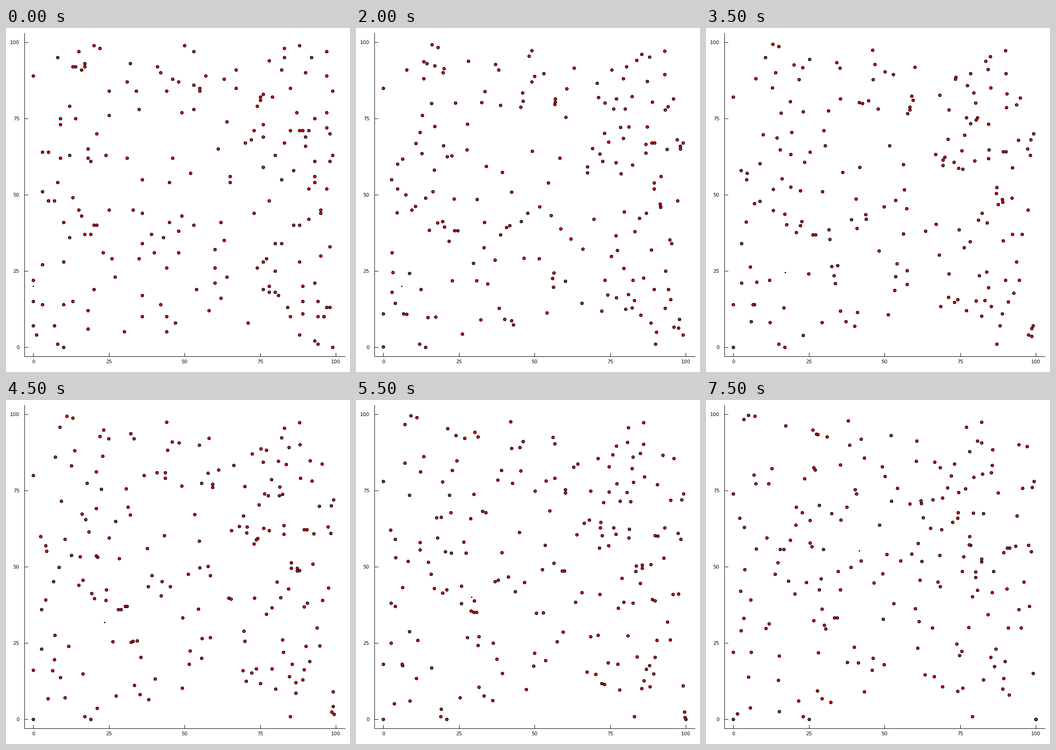
Write a matplotlib script that moves like this. It is 748 by 749 pixels and loops after 8000 ms.

```python
import numpy as np
import matplotlib.pyplot as plt
from matplotlib.animation import FuncAnimation

W, H, DPI = 748, 749, 100
FRAMES, INTERVAL = 16, 500
PX = 72 / DPI

CORNERS = {"sw": (0, 0), "se": (100, 0), "nw": (0, 100), "ne": (100, 100)}

# Walkers around the rim, grouped by the corner they walk to.
RIM = {
    "sw": [(15, 97), (8, 95), (14, 92), (0, 89), (50, 99), (48, 87), (63, 88),
           (34, 84), (25, 84), (88, 99), (83, 95), (78, 94), (82, 91), (90, 90),
           (99, 84), (85, 85), (76, 83), (1, 4), (94, 1)],
    "se": [(17, 93), (55, 85), (55, 84), (31, 87), (44, 84), (83, 98), (75, 82),
           (79, 82), (25, 76), (0, 15), (8, 1), (10, 0), (3, 64), (96, 10),
           (98, 70)],
    "nw": [(20, 99), (22, 98), (17, 92), (53, 97), (32, 93), (41, 92), (42, 90),
           (53, 86), (57, 89), (67, 91), (92, 95), (97, 97), (97, 89), (75, 81),
           (97, 77), (49, 77), (3, 14), (0, 7), (3, 27), (3, 51), (5, 48),
           (93, 2), (98, 13)],
    "ne": [(13, 92), (16, 91), (46, 88), (67, 85), (74, 79), (87, 77), (93, 75),
           (12, 79), (35, 78), (53, 78), (0, 22), (99, 0), (88, 4), (99, 63),
           (98, 61)],
}

# Scattered interior walkers: count, x range, y range.
BANDS = [(29, (5, 22), (4, 76)), (32, (22, 59), (5, 65)), (65, (60, 99), (4, 75))]

# Runner: step number and position.
RUN = np.array([(0, 0, 20), (1, 0, 20), (2, 1, 20), (3, 3, 20), (4, 6, 20),
                (5, 10, 20), (6, 13.8, 21), (9, 23.6, 31.7), (11, 29.2, 40),
                (15, 41.6, 55.2)])


def make_walkers():
    rng = np.random.default_rng(7)
    start = [p for group in RIM.values() for p in group]
    goal = [CORNERS[c] for c, group in RIM.items() for _ in group]
    corners = list(CORNERS.values())
    for n, xs, ys in BANDS:
        start += list(zip(rng.integers(*xs, n), rng.integers(*ys, n)))
        goal += [corners[i] for i in rng.integers(0, 4, n)]
    return np.array(start, float), np.array(goal, float)


START, GOAL = make_walkers()
DIST = np.hypot(*(GOAL - START).T)


def walkers_at(step):
    """Everyone walks one unit per step and stops at the corner."""
    part = np.minimum(step, DIST) / np.maximum(DIST, 1e-9)
    return START + (GOAL - START) * part[:, None]


def runner_at(step):
    return [np.interp(step, RUN[:, 0], RUN[:, i]) for i in (1, 2)]


plt.rcParams["font.family"] = "DejaVu Sans"
fig = plt.figure(figsize=(W / DPI, H / DPI), dpi=DPI, facecolor="white")
left, right, top, bottom = 39.5, 736.8, 11.1, 714.5
ax = fig.add_axes([left / W, 1 - bottom / H, (right - left) / W, (bottom - top) / H])
ax.set(xlim=(-3, 103), ylim=(-3, 103),
       xticks=range(0, 101, 25), yticks=range(0, 101, 25))
ax.spines[["top", "right"]].set_visible(False)
for side in ("left", "bottom"):
    ax.spines[side].set_linewidth(PX)
ax.tick_params(direction="in", length=8 * PX, width=PX, labelsize=10.6 * PX)
ax.tick_params(axis="x", pad=8 * PX)
ax.tick_params(axis="y", pad=10.5 * PX)

dots, = ax.plot([], [], "o", ms=6 * PX, mfc="red", mec="black", mew=1.4 * PX,
                clip_on=False, snap=False, zorder=3)
runner, = ax.plot([], [], "o", ms=3 * PX, color="black", mew=0,
                  clip_on=False, snap=False, zorder=4)


def update(step):
    dots.set_data(*walkers_at(step).T)
    x, y = runner_at(step)
    runner.set_data([x], [y])
    return dots, runner


anim = FuncAnimation(fig, update, frames=FRAMES, interval=INTERVAL,
                     repeat=True, repeat_delay=0, blit=False)
plt.show()
```
